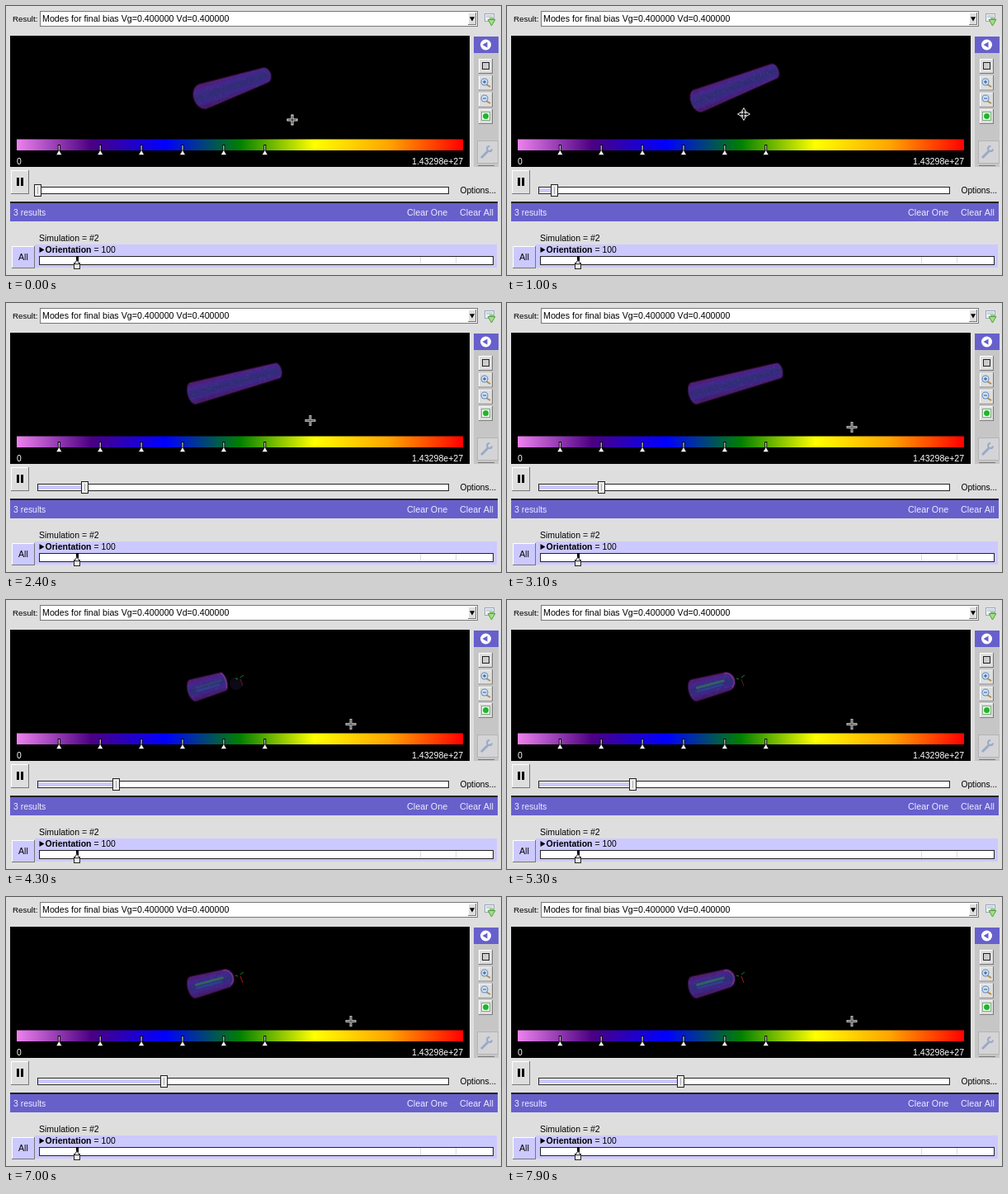
These frames come from a looping animation (600x326 px, 8 s). An HTML page with a canvas:

```html
<!DOCTYPE html>
<html lang="en">
<head>
<meta charset="utf-8">
<title>Volume viewer</title>
<style>
html, body { margin: 0; width: 600px; height: 326px; overflow: hidden; background: #dedede; }
canvas { display: block; }
</style>
</head>
<body>
<canvas id="stage" width="600" height="326"></canvas>
<script>
const c = document.getElementById('stage').getContext('2d');
const LOOP = 8000, STEP = 850;
const DRAG_START = 300, DRAG_END = 1400;
const PURPLE = '#6760cb', PALE = '#ccc9ff', GREY = '#dedede', INK = '#222';

const mix = (a, b, u) => a + (b - a) * u;
const progress = (t, from, to) => Math.min(1, Math.max(0, (t - from) / (to - from)));

function seeded(seed) {
  return () => (seed = (seed * 16807) % 2147483647) / 2147483647;
}

function rect(x, y, w, h, fill) {
  c.fillStyle = fill;
  c.fillRect(x, y, w, h);
}

function box(x, y, w, h, fill, edge) {
  rect(x, y, w, h, edge);
  rect(x + 1, y + 1, w - 2, h - 2, fill);
}

function bevel(x, y, w, h, fill = GREY) {
  rect(x, y, w, h, '#777');
  rect(x, y, w - 1, h - 1, '#fff');
  rect(x + 1, y + 1, w - 2, h - 2, fill);
}

function text(s, x, y, fill = '#000', size = 10.6, weight = '') {
  c.font = `${weight} ${size}px "Liberation Sans", Arial, sans-serif`;
  c.fillStyle = fill;
  c.fillText(s, x, y);
}

function stroke(color, width = 1) {
  c.strokeStyle = color;
  c.lineWidth = width;
  c.stroke();
}

function line(x1, y1, x2, y2, color, width = 1) {
  c.beginPath();
  c.moveTo(x1, y1);
  c.lineTo(x2, y2);
  stroke(color, width);
}

function disc(x, y, r, fill) {
  c.beginPath();
  c.arc(x, y, r, 0, 7);
  c.fillStyle = fill;
  c.fill();
}

// Equilateral arrowhead; turn counts quarter turns clockwise from up
function arrow(x, y, r, turn, fill, edge) {
  c.beginPath();
  for (let i = 0; i < 3; i++) {
    const a = (turn - 1) * Math.PI / 2 + i * Math.PI * 2 / 3;
    c.lineTo(x + r * Math.cos(a), y + r * Math.sin(a));
  }
  c.closePath();
  c.fillStyle = fill;
  c.fill();
  if (edge) stroke(edge);
}

function plus(r, color, width) {
  line(-r, 0, r, 0, color, width);
  line(0, -r, 0, r, color, width);
}

function drawTop() {
  text('Result:', 8, 19, '#000', 9.8);
  box(41, 6, 531, 19, '#fff', '#777');
  text('Modes for final bias Vg=0.400000 Vd=0.400000', 44, 19, '#000', 10.7);
  bevel(560, 8, 10, 15);
  arrow(565, 15, 3.5, 2, '#000');
  box(580, 9, 12, 10, '#eef1f6', '#9aa7b8');
  rect(582, 11, 8, 3, '#c9d3e0');
  rect(586, 14, 5, 4, '#8cc873');
  arrow(588.5, 19, 5, 2, '#a5dc8c', '#4fa33a');
}

function drawTools() {
  rect(567, 57, 30, 138, '#c6c6c6');
  rect(567, 37, 30, 20, PURPLE);
  disc(581.5, 47, 6.5, '#fff');
  arrow(581.5, 47, 4, 3, PURPLE);
  for (let i = 0; i < 4; i++) bevel(573, 64 + i * 20.3, 17, 18);
  box(577, 68, 9, 9, '#ccc', INK);
  for (const y of [92, 112]) {
    line(582, y + 3, 587, y + 6, '#b58a42', 2);
    disc(580, y, 4.5, '#668bbd');
    disc(580, y, 3.4, '#cfe1f6');
    line(578, y, 582, y, '#27527f');
  }
  line(580, 90, 580, 94, '#27527f');
  box(576, 128, 11, 11, '#f2fff2', '#79a87b');
  disc(581.5, 133.5, 3.5, '#22b52c');
  box(571, 163, 26, 28, '#d4d4d6', '#b4b4b4');
  line(576, 184, 584, 176, '#9aa9c6', 3);
  c.beginPath();
  c.arc(586, 173, 3, .1, 4.8);
  stroke('#9aa9c6', 2);
  line(572, 193.5, 592, 193.5, '#777');
}

function drawScale() {
  const g = c.createLinearGradient(13, 0, 554, 0);
  ['#ee82ee', '#4b0082', '#00f', '#008000', '#ff0', '#ffa500', '#f00']
    .forEach((color, i) => g.addColorStop(i / 6, color));
  rect(13, 161.5, 541, 13.5, g);
  for (let i = 0; i < 6; i++) {
    const x = 64.3 + i * 49.9;
    line(x, 168, x, 176, '#000', 3);
    line(x, 169, x, 176, '#fff');
    arrow(x, 178.5, 4, 0, '#fff', 'rgba(0,0,0,.6)');
  }
  text('0', 13, 192, '#fff', 10.3);
  text('1.43298e+27', 492, 192, '#fff');
}

// Translucent rod along its own x axis, speckled like a sliced volume
function rod(a, b, cap, endCap, seed, core = 0) {
  const len = Math.hypot(b.x - a.x, b.y - a.y), rnd = seeded(seed);
  c.save();
  c.translate(a.x, a.y);
  c.rotate(Math.atan2(b.y - a.y, b.x - a.x));
  c.beginPath();
  c.ellipse(0, 0, a.r * cap, a.r, 0, Math.PI / 2, Math.PI * 1.5);
  c.ellipse(len, 0, b.r * endCap, b.r, 0, -Math.PI / 2, Math.PI / 2);
  c.closePath();
  const g = c.createLinearGradient(0, -a.r, 0, a.r);
  ['#43195f', '#43248a', '#2f2b70', '#3f2385', '#35164e']
    .forEach((color, i) => g.addColorStop(i / 4, color));
  c.fillStyle = g;
  c.fill();
  stroke('rgba(100,30,125,.4)', 2.5);
  c.clip();
  for (let x = -a.r; x < len + b.r; x += 2)
    for (let y = -a.r; y < a.r; y += 2) {
      const shade = Math.abs(y) > a.r * .6 ? '#9a3cc0' : rnd() < .18 ? '#32907c' : '#4743b4';
      c.globalAlpha = .15 + rnd() * .4;
      rect(x, y, 1, 1, shade);
    }
  c.globalAlpha = 1;
  if (core) {
    c.beginPath();
    c.ellipse(len, 0, b.r * endCap, b.r, 0, -1.6, 1);
    stroke('rgba(165,70,150,.5)', 3);
    line(3, -2, len - 2, -2, `rgba(45,130,85,${core})`, 3);
    line(3, 2, len - 5, 2, 'rgba(45,75,150,.6)', 3);
  }
  c.restore();
}

function drawVolume(t, step) {
  const u = progress(t, DRAG_START, DRAG_END), swing = Math.sin(Math.PI * u);
  const near = { x: mix(239, 227, u), y: 109.5 + 6 * swing, r: mix(15, 13, u) };
  const far = { x: mix(314, 329, u), y: mix(84, 82, u) - 4 * swing, r: 9 };
  if (step < 5) {
    const cap = mix(.75, .5, u);
    rod(near, far, cap, cap, 31 + step);
    return;
  }
  const open = step > 5;
  if (!open) disc(279, 101, 8, '#0d0915');
  rod(near, { x: open ? 266 : 263, y: 99, r: 11 }, .5, open ? .9 : .4, 31 + step, open ? .65 : .2);
  line(278, 95, 281, 96, '#187e28');
  line(284, 94, 288, 91, '#187e28');
  line(284, 96, 287, 104, step > 7 ? '#b5151e' : '#60192a');
}

function drawPlayer(step) {
  bevel(6, 199, 22, 29);
  rect(13, 208, 3, 10, '#000');
  rect(18, 208, 3, 10, '#000');
  box(38, 219, 499, 9, '#fff', INK);
  const x = Math.round(37.5 + step * 19.15);
  rect(39, 221, x - 39, 5, PALE);
  box(x - 4, 216, 9, 15, '#eee', INK);
  rect(x, 219, 1, 9, '#aaa');
  text('Options...', 550.5, 227, '#000', 10.2);
}

function drawResults() {
  rect(5, 237, 591, 2, INK);
  rect(5, 239, 591, 22, PURPLE);
  text('3 results', 9, 254, '#eeecff', 10.4);
  text('Clear One', 486, 254, '#eeecff', 10.8);
  text('Clear All', 550, 254, '#eeecff', 10.8);
  text('Simulation = #2', 40, 285, '#000', 10.5);
  rect(35, 289, 560, 28, PALE);
  bevel(7, 291, 28, 27, PALE);
  text('All', 15, 308);
  arrow(42.5, 295.5, 4, 1, '#000');
  text('Orientation', 47.5, 299, '#000', 10.5, 'bold');
  text('= 100', 106.5, 299, '#000', 10.4);
  box(40, 303, 551, 11, '#fff', INK);
  rect(502, 304, 1, 9, '#ddd');
  rect(545, 304, 1, 9, '#ddd');
  rect(85, 303, 3, 6, '#000');
  box(82, 311, 8, 8, '#eee', INK);
  arrow(86, 311, 3.5, 0, '#eee', INK);
}

function drawPointer(t) {
  const reach = progress(t, 0, DRAG_START), drag = progress(t, DRAG_START, DRAG_END);
  const leave = progress(t, 1900, 2700);
  const dragY = mix(122, 129, drag) + 5 * Math.sin(Math.PI * drag);
  c.save();
  c.translate(mix(mix(347, 287, reach), 418, leave), mix(mix(138, dragY, reach), 150.5, leave));
  if (reach === 1 && drag < 1) {
    plus(5, '#e8e8e8', 4);
    for (let i = 0; i < 4; i++) {
      arrow(0, -4.5, 3, 0, '#111', '#e8e8e8');
      c.rotate(Math.PI / 2);
    }
    plus(5, '#111', 1.5);
  } else {
    plus(6.5, drag ? '#bbb' : '#fff', 3);
    plus(5.5, drag ? '#555' : '#000', 1);
  }
  c.restore();
}

function frame(now) {
  const t = Math.floor(now % LOOP / 100) * 100;
  const step = Math.floor((t + 450) / STEP);
  rect(0, 0, 600, 326, GREY);
  drawTop();
  rect(5, 36, 557, 159, '#000');
  drawTools();
  drawVolume(t, step);
  drawScale();
  drawPlayer(step);
  drawResults();
  drawPointer(t);
  requestAnimationFrame(frame);
}
requestAnimationFrame(frame);
</script>
</body>
</html>
```
